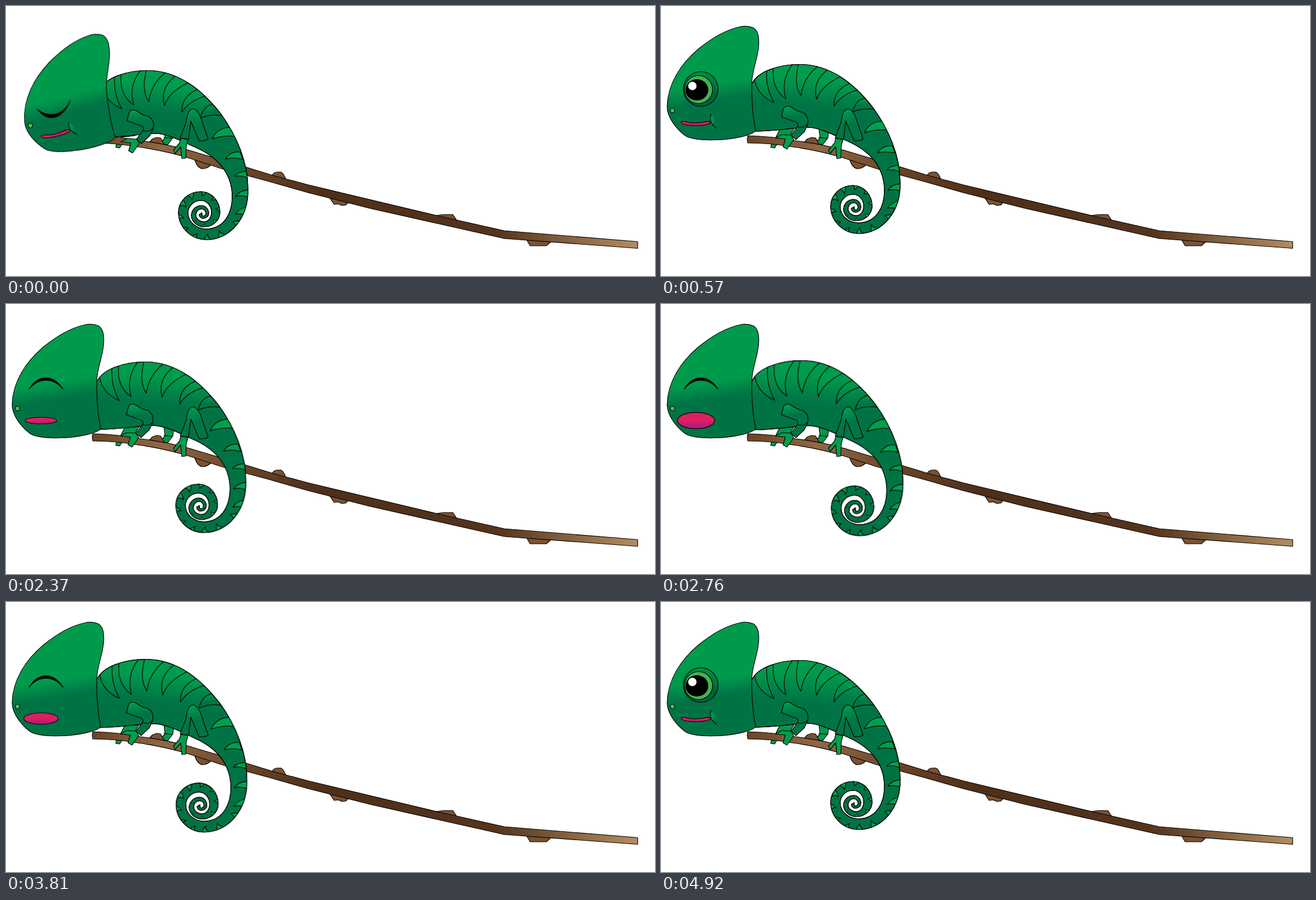
An HTML page without scripts that plays this animation: 1159x483 px, repeating every 5.94 s.

```html
<!DOCTYPE html>
<html lang="en">
<head>
<meta charset="utf-8">
<title>Chameleon on a branch</title>
<style>
  html, body { margin: 0; width: 100%; height: 100%; overflow: hidden; background: #fff; }
  svg { display: block; width: 100vw; height: 100vh; }

  .ink { stroke: #000; stroke-width: 1.2; stroke-linejoin: round; }
  .light { fill: #009f4f; }
  .dark { fill: #007344; }

  .lift, .arm, .head, .jaw, .breath, .smile, .laugh, .open, .asleep, .happy {
    animation: 5940ms linear infinite;
  }

  /* Waking up */
  .lift { animation-name: lift; }
  .arm { animation-name: arm; }
  .head { animation-name: head; transform-origin: 20px 187px; }
  .jaw { animation-name: jaw; transform-origin: 63px 208px; }
  @keyframes lift { 0% { transform: translate(5px, 11px); } 9.596%, 100% { transform: none; } }
  @keyframes arm { 0% { transform: translate(1px, 7px); } 9.596%, 100% { transform: none; } }
  @keyframes head {
    0% { transform: translate(23px, 27px) rotate(-5.8deg); }
    9.596%, 100% { transform: translate(0, 0) rotate(0); }
  }
  @keyframes jaw {
    0% { transform: translate(2px, -3px) rotate(-7deg); }
    9.596%, 100% { transform: translate(0, 0) rotate(0); }
  }

  /* Eyes */
  .asleep { animation-name: asleep; }
  .open { animation-name: open; }
  .happy { animation-name: happy; }
  @keyframes asleep { 0% { opacity: 1; } 9.596%, 100% { opacity: 0; } }
  @keyframes open {
    0% { opacity: 0; }
    9.596%, 29.293% { opacity: 1; }
    31.818%, 79.798% { opacity: 0; }
    82.828%, 100% { opacity: 1; }
  }
  @keyframes happy {
    0%, 29.293% { opacity: 0; }
    31.818%, 79.798% { opacity: 1; }
    82.828%, 100% { opacity: 0; }
  }

  /* Deep breath with open mouth */
  .breath { animation-name: breath; transform-origin: 172px 198px; }
  .smile { animation-name: smile; }
  .laugh { animation-name: laugh; }
  @keyframes breath {
    0%, 79.798%, 100% { transform: scale(1, 1) skewX(0deg); }
    31.818% { transform: scale(1, 1) skewX(0deg); animation-timing-function: cubic-bezier(.45, 0, .75, .4); }
    47.98% { transform: scale(1.033, 1.045) skewX(-.95deg); }
  }
  @keyframes laugh {
    0%, 31.818% { rx: 26.5px; ry: 3px; opacity: 0; animation-timing-function: cubic-bezier(.45, 0, .75, .4); }
    35%, 75% { opacity: 1; }
    47.98% { rx: 35px; ry: 17.8px; }
    79.798%, 100% { rx: 26.5px; ry: 3px; opacity: 0; }
  }
  @keyframes smile {
    0%, 31.818%, 79.798%, 100% { opacity: 1; }
    42%, 71% { opacity: 0; }
  }
</style>
</head>
<body>
<svg viewBox="0 0 1159 483" preserveAspectRatio="none">
  <defs>
    <linearGradient id="skin" gradientUnits="userSpaceOnUse" x1="255" y1="110" x2="245" y2="195">
      <stop offset=".2" stop-color="#009a4c"/><stop offset=".8" stop-color="#007344"/>
    </linearGradient>
    <linearGradient id="stripe" gradientUnits="userSpaceOnUse" x1="255" y1="110" x2="245" y2="195">
      <stop offset=".25" stop-color="#009c4d"/><stop offset=".85" stop-color="#007545"/>
    </linearGradient>
    <linearGradient id="face" gradientUnits="userSpaceOnUse" x1="84" y1="126" x2="93" y2="182">
      <stop offset=".25" stop-color="#009a4c"/><stop offset=".8" stop-color="#007344"/>
    </linearGradient>
    <linearGradient id="limb" x2=".2" y2="1">
      <stop offset=".1" stop-color="#009b4d"/><stop offset=".6" stop-color="#007545"/>
    </linearGradient>
    <linearGradient id="socket" x2="0" y2="1">
      <stop offset=".1" stop-color="#008a48"/><stop offset=".65" stop-color="#006239"/>
    </linearGradient>
    <linearGradient id="lips" x2="0" y2="1">
      <stop offset=".5" stop-color="#dc1f63"/><stop offset="1" stop-color="#a9177d"/>
    </linearGradient>
    <linearGradient id="wood" gradientUnits="userSpaceOnUse" x1="155" y1="0" x2="1128" y2="0">
      <stop offset="0" stop-color="#6b4527"/><stop offset=".13" stop-color="#906845"/>
      <stop offset=".28" stop-color="#694327"/><stop offset=".42" stop-color="#4e2f1a"/>
      <stop offset=".74" stop-color="#55341d"/><stop offset="1" stop-color="#b38d62"/>
    </linearGradient>
    <path id="fang" d="M-6 1Q-3 -6 3 -9Q0 -4 6 1"/>
    <path id="body" d="M162 140C172 117 210 104.500 248 104.500C305 104.500 347 142 378 181C408 222 427 270 427 315
      C429 367 396 407 353 407A50 49 0 0 1 303 358A40 37 0 0 1 343 321A34 37 0 0 1 377 358A28 26 0 0 1 349 384
      A23 21 0 0 1 326 363A18 18 0 0 1 344 346A13 14 0 0 1 357 360A10 9 0 0 1 347 369A7 7 0 0 1 340 362L345 359
      Q344 364 347 365A5 5 0 0 0 352 360A8 8 0 0 0 344 352A10 11 0 0 0 334 363A15 12 0 0 0 349 375
      A13 17 0 0 0 362 358A19 21 0 0 0 343 337A23 22 0 0 0 320 359A33 29 0 0 0 353 388
      C386 387 399 358 399 330C399 295 380 263 336 243C305 229 285 218 262 217C235 218 200 224 169 224H150V150Z"/>
    <clipPath id="inside"><use href="#body"/></clipPath>
  </defs>

  <!-- Far limbs -->
  <g class="ink" fill="#009a4c">
    <path d="M282 219L300 221L298 236L289 248L275 246L284 236Z"/>
    <path d="M281 235L298 237" fill="none"/>
    <path d="M214 217L240 215L230 232L205 235Z"/>
    <path d="M196 253L203 254L209 244L198 242Z"/>
  </g>

  <g class="ink">
    <path fill="#7a5233" d="M256 244L261 238L269 235L276 236L283 248ZM337 275Q342 291 352 291Q360 291 368 282ZM475 303Q479 297 484 297H491Q496 299 500 311ZM578 343L586 355L593 354L600 357L607 356L612 350ZM766 375L782 373H798L806 385ZM929 417L936 429H965L976 419Z"/>
    <path fill="url(#wood)" d="M155 232Q200 233 240 241Q295 248 340 262L428 288L480 304L540 320L770 375L890 402L1128 421.500V433.500L890 416L770 389L650 362L540 334L470 314L385 291L330 273Q285 259 235 252Q195 245 155 245L154 238Z"/>
  </g>

  <g class="lift">
    <g class="breath ink">
      <use href="#body" fill="url(#skin)"/>
      <g clip-path="url(#inside)">
        <g fill="url(#stripe)">
          <path d="M167 132Q172 160 202 173Q186 146 189 113"/>
          <path d="M201 108Q196 148 223 166Q213 132 236 103"/>
          <path d="M246 103Q236 140 250 160Q254 128 281 107"/>
          <path d="M299 113Q269 135 278 167Q286 142 323 125"/>
          <path d="M338 138Q308 150 309 179Q324 157 352 150"/>
          <path d="M342 190Q347 168 364 165L382 185Q358 182 342 190" fill="url(#limb)"/>
        </g>
        <g class="light">
          <path d="M363 227Q373 206 396 206L406 222Q382 220 363 227"/>
          <path d="M387 263Q395 249 413 250L418 263Q399 259 387 263"/>
          <path d="M403 294Q408 285 427 285L429 297Q412 291 403 294"/>
          <path d="M405 330Q412 318 430 318V332Q415 326 405 330"/>
          <path d="M404 362Q412 350 428 348L425 364Q412 359 404 362"/>
          <path d="M399 375Q410 371 418 377L406 391Q407 378 399 375"/>
        </g>
        <g class="light" transform="translate(345 361)">
          <use href="#fang" transform="rotate(-42) translate(0 52)"/>
          <use href="#fang" transform="rotate(-12) translate(0 46)"/>
          <use href="#fang" transform="rotate(17) translate(0 45)"/>
          <use href="#fang" transform="rotate(48) translate(0 44)"/>
          <use href="#fang" transform="rotate(82) translate(0 42)"/>
          <use href="#fang" transform="rotate(118) translate(0 40)"/>
          <use href="#fang" transform="rotate(150) translate(0 40)"/>
          <use href="#fang" transform="rotate(184) translate(0 40) scale(.9)"/>
          <use href="#fang" transform="rotate(218) translate(0 37) scale(.8)"/>
          <use href="#fang" transform="rotate(254) translate(0 33) scale(.8)"/>
          <use href="#fang" transform="rotate(300) translate(0 28) scale(.7)"/>
          <use href="#fang" transform="rotate(350) translate(0 23) scale(.6)"/>
          <use href="#fang" transform="rotate(45) translate(0 21) scale(.5)"/>
          <use href="#fang" transform="rotate(110) translate(0 18) scale(.45)"/>
          <use href="#fang" transform="rotate(180) translate(0 15) scale(.4)"/>
        </g>
      </g>
      <use href="#body" fill="none"/>
    </g>
  </g>

  <!-- Near limbs -->
  <g class="ink">
    <path fill="url(#limb)" d="M322 207Q324 185 334 184Q344 186 350 206L361 238Q355 242 345 241L330 206L326 238L311 236Z"/>
    <path class="light" d="M312 237L325 239L322 250L321 272L314 273L312 252L302 264L299 258L310 245Z"/>
  </g>
  <g class="arm ink">
    <path class="dark" d="M245 214L232 231L241 239L256 225L262 212Z"/>
    <path fill="url(#limb)" d="M219 183Q222 177 231 180Q245 190 253 190Q265 197 262 211Q256 219 244 216Q247 208 236 206L215 198Z"/>
    <path class="light" d="M232 231L216 230L204 236L222 238L218 252L225 256L237 239Z"/>
  </g>

  <g class="head">
    <path class="ink" fill="url(#face)" d="M169 222C168 230 130 239 95 239.500C68 240 50 237 42 231C28 220 11 200 11 180C12 140 34 105 66 77.500C94 54.500 119 42 140 37.500Q153 34 165 39C174 45 175 56 174.500 70C173 95 162 115 162 140Q162 190 169 222Z"/>
    <circle class="ink" cx="20.500" cy="187" r="4" fill="#4cbf55"/>

    <g class="jaw ink">
      <g class="smile">
        <path fill="#009249" stroke="none" d="M91 192Q84 202 89 212Q96 211 96 203Q91 199 91 192Z"/>
        <path fill="none" d="M90 193Q83 209 100 219"/>
        <path fill="url(#lips)" d="M36 207C38 204 48 210 62 209C75 209 88 204 88 208C88 212 75 214 62 214C45 214 36 212 36 207Z"/>
      </g>
      <ellipse class="laugh" cx="62.500" cy="208.500" rx="26.500" ry="3" fill="url(#lips)"/>
    </g>

    <path class="asleep" d="M35 158C51 187 81 182 96 149C83 174 55 179 35 158Z" stroke="#000"/>
    <path class="happy" d="M41 153C55 125 87 125 102 153C85 131 58 131 41 153Z" stroke="#000"/>
    <g class="open">
      <circle class="ink" cx="71" cy="148.500" r="31" fill="url(#socket)"/>
      <circle class="ink" cx="67" cy="149.500" r="25" fill="#45b14f"/>
      <ellipse cx="64" cy="150" rx="20.500" ry="19"/>
      <circle cx="56" cy="143" r="7.500" fill="#fff"/>
    </g>
  </g>
</svg>
</body>
</html>
```
